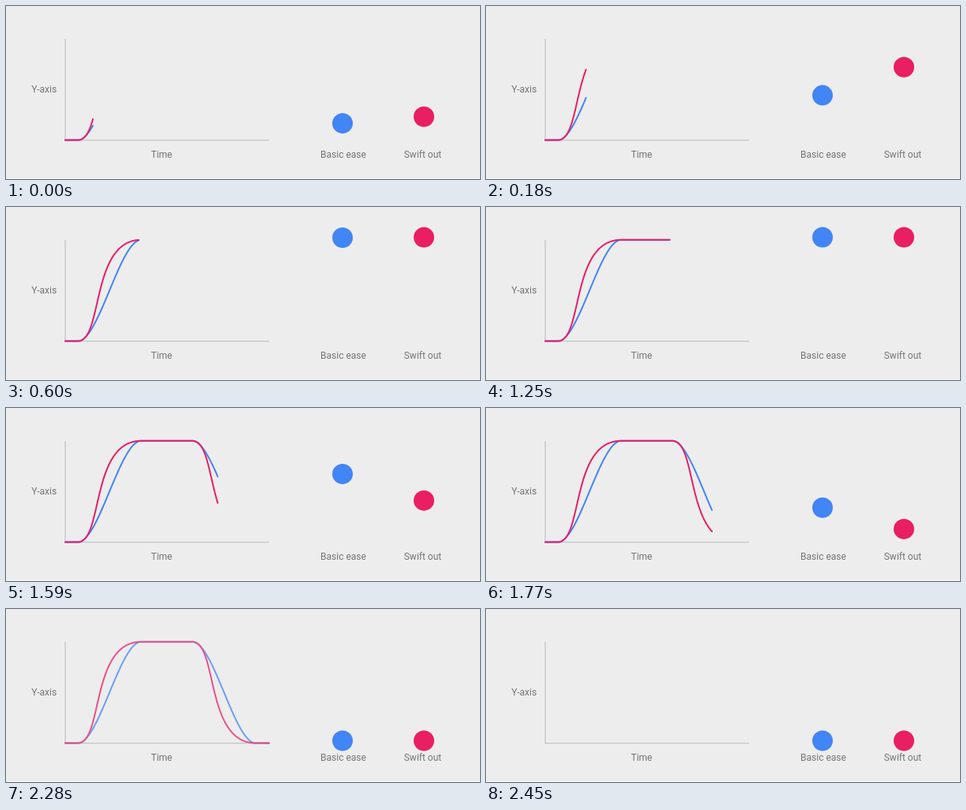
An HTML page that plays this animation: 600 by 220 pixels, repeating every 2740 ms.

```html
<!DOCTYPE html>
<html lang="en">
<head>
<meta charset="utf-8">
<title>Easing comparison</title>
<style>
  html, body { margin: 0; width: 100%; height: 100%; overflow: hidden; background: #ededee; }
  svg { display: block; width: 600px; height: 220px; }
  text { font: 12px Roboto, sans-serif; fill: #757575; text-anchor: middle; }
  .axes { fill: none; stroke: #c4c4c7; stroke-width: 1.3; }
  .curve { fill: none; stroke-width: 2; stroke-linecap: round; stroke-linejoin: round; }
</style>
</head>
<body>
<svg viewBox="0 0 600 220">
  <rect width="600" height="220" fill="#ededee"/>
  <rect y="219" width="600" height="1" fill="#f8f8f8"/>
  <path class="axes" d="M75 42V170.6H333"/>
  <g id="curves">
    <polyline class="curve" id="basicCurve" stroke="#4285f4"/>
    <polyline class="curve" id="swiftCurve" stroke="#e91e63"/>
  </g>
  <circle id="basicBall" cx="426" r="13" fill="#4285f4"/>
  <circle id="swiftBall" cx="529" r="13" fill="#e91e63"/>
  <text x="48.2" y="110">Y-axis</text>
  <text x="197" y="193">Time</text>
  <text x="427" y="193">Basic ease</text>
  <text x="527.5" y="193">Swift out</text>
</svg>
<script>
const LOOP = 2740, LAST = 42, FADE_FROM = 38;
const LEFT = 75, RISE = 91, FALL = 236, SPAN = 80;
const SHORT_STEPS = [13, 22, 26, 31, 35, 37, 41];
// [step, x of the pen]
const PEN = [[0, 110], [3, 126.6], [10, 168], [21, 232.5], [27, 268], [34, 310], [38, 333]];
const $ = id => document.getElementById(id);

// cubic-bezier(x1, 0, x2, 1)
const bezier = (x1, x2) => s => {
  if (s <= 0) return 0;
  if (s >= 1) return 1;
  let lo = 0, hi = 1, u;
  for (let n = 0; n < 24; n++) {
    u = (lo + hi) / 2;
    const x = 3 * u * (1 - u) * ((1 - u) * x1 + u * x2) + u ** 3;
    if (x < s) lo = u; else hi = u;
  }
  return u * u * (3 - 2 * u);
};

const tracks = [
  { ease: bezier(1 / 3, 2 / 3), curve: $('basicCurve'), ball: $('basicBall') },
  { ease: bezier(0.4, 0.2), curve: $('swiftCurve'), ball: $('swiftBall') }
];

const level = (ease, x) => ease((x - RISE) / SPAN) - ease((x - FALL) / SPAN);

// Steps last 60 ms, a few of them 50 ms
const starts = [0];
for (let i = 0; i < LAST; i++) starts.push(starts[i] + (SHORT_STEPS.includes(i) ? 50 : 60));

function penX(step) {
  const k = PEN.findIndex(p => p[0] > step);
  if (k < 0) return PEN[PEN.length - 1][1];
  const [a, xa] = PEN[k - 1], [b, xb] = PEN[k];
  return xa + (xb - xa) * (step - a) / (b - a);
}

function draw(time) {
  let step = LAST;
  while (starts[step] > time) step--;
  const end = penX(step);
  for (const { ease, curve, ball } of tracks) {
    const point = x => `${x},${(170.5 - 128.7 * level(ease, x)).toFixed(2)}`;
    const points = [];
    for (let x = LEFT; x < end; x++) points.push(point(x));
    points.push(point(end));
    curve.setAttribute('points', points.join(' '));
    ball.setAttribute('cy', 167.5 - 129 * level(ease, end));
  }
  const fade = Math.max(0, step - FADE_FROM) / (LAST - FADE_FROM);
  $('curves').setAttribute('opacity', 1 - fade);
}

const origin = performance.now();
function tick() {
  draw((performance.now() - origin) % LOOP);
  requestAnimationFrame(tick);
}
tick();
</script>
</body>
</html>
```
